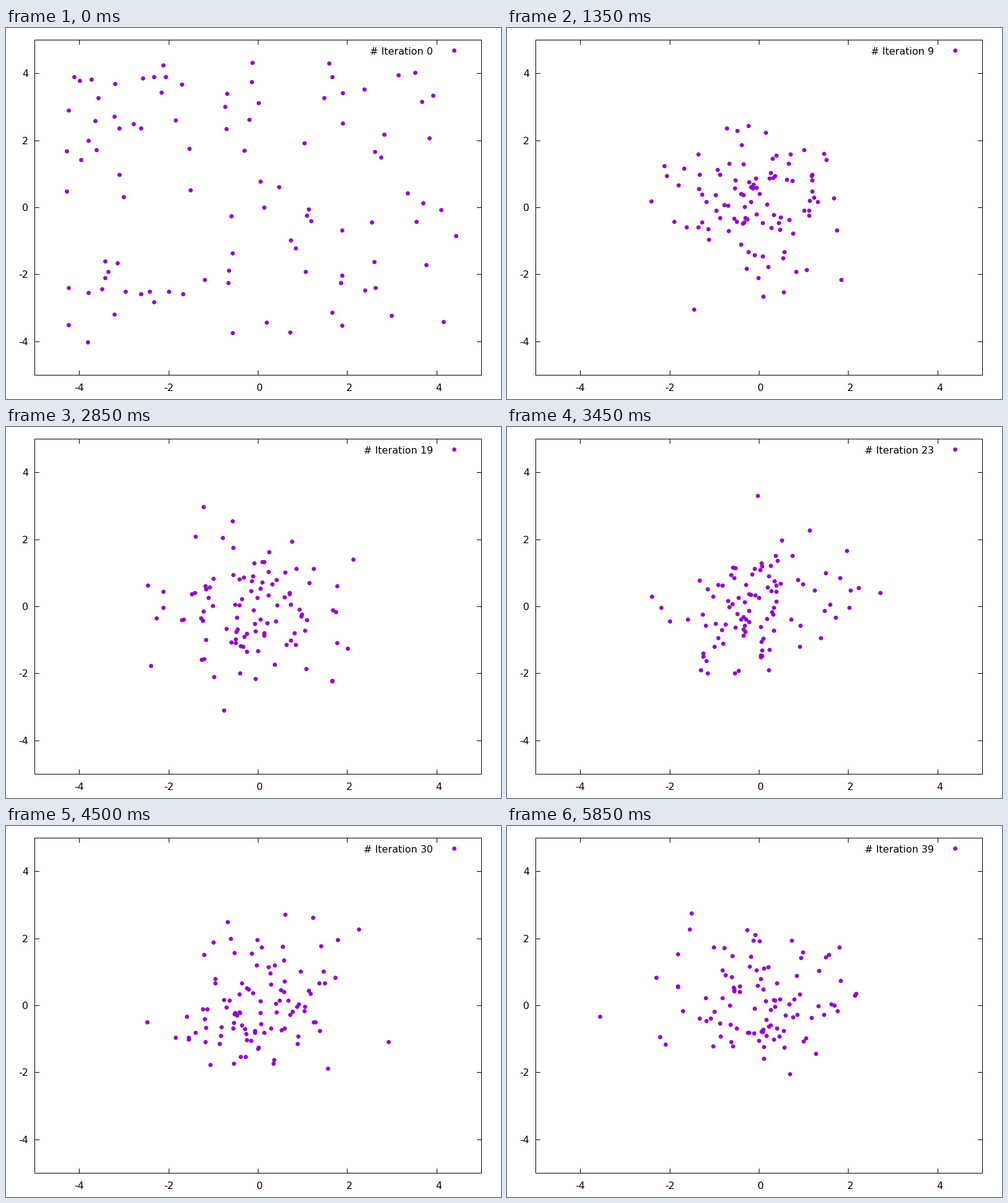
Recreate the animation shown at these times as a matplotlib script. Size 800 by 600 pixels, loop 6 s.

```python
import math

import numpy as np
import matplotlib.pyplot as plt
from matplotlib.animation import FuncAnimation
from matplotlib.patches import Circle

W, H, DPI = 800, 600, 100
FRAMES, INTERVAL = 40, 150
PT = 72 / DPI                                # points per pixel
LEFT, RIGHT, TOP, BOTTOM = 46.5, 768.5, 19.5, 561.5
CENTRE = np.array([407.5, 290.5])
SCALE = np.array([72.2, -54.2])              # pixels per data unit
TICK = 7
VIOLET = "#9400D3"
WALKERS = 100
PULL, SPREAD = 0.7, 1.05                     # memory per step, settled width


def to_pixels(points):
    """Data units to the centres of the nearest pixels."""
    return np.floor(CENTRE + SCALE * np.asarray(points)) + 0.5


def make_track():
    """Walkers start scattered, then gather into a restless cloud."""
    rng = np.random.default_rng(12)
    points = rng.uniform((-4.3, -4.1), (4.6, 4.35), (WALKERS, 2))
    noise = SPREAD * math.sqrt(1 - PULL ** 2)
    track = [points]
    for _ in range(FRAMES - 1):
        points = PULL * points + noise * rng.standard_normal(points.shape)
        track.append(points)
    return track


fig = plt.figure(figsize=(W / DPI, H / DPI), dpi=DPI, facecolor="white")
ax = fig.add_axes([0, 0, 1, 1])
ax.set_xlim(0, W)
ax.set_ylim(H, 0)
ax.axis("off")


def line(xs, ys):
    ax.plot(xs, ys, color="black", lw=PT, snap=False,
            solid_capstyle="projecting", solid_joinstyle="miter")


def label(x, y, text, ha):
    return ax.text(x, y, text, ha=ha, va="baseline", color="black",
                   family="DejaVu Sans", size=16 * PT)


def dot(x, y):
    return ax.add_patch(Circle((x, y), 3.4, color=VIOLET, lw=0))


def draw_axes():
    line([LEFT, RIGHT, RIGHT, LEFT, LEFT], [TOP, TOP, BOTTOM, BOTTOM, TOP])
    for value in range(-4, 5, 2):
        x, y = to_pixels([value, value])
        line([x, x], [TOP, TOP + TICK])
        line([x, x], [BOTTOM, BOTTOM - TICK])
        line([LEFT, LEFT + TICK], [y, y])
        line([RIGHT, RIGHT - TICK], [y, y])
        pad = 0 if value < 0 else 3          # room kept for a sign
        label(x + pad, 587, str(value), "center")
        label(36, y + 5.6, str(value), "right")


draw_axes()
track = make_track()
swarm = [dot(0, 0) for _ in range(WALKERS)]
dot(724.5, 36.5)
title = label(690, 43, "", "right")


def update(i):
    for walker, centre in zip(swarm, to_pixels(track[i])):
        walker.center = centre
    title.set_text(f"# Iteration {i}")
    return [*swarm, title]


anim = FuncAnimation(fig, update, frames=FRAMES, interval=INTERVAL,
                     repeat=True, repeat_delay=0)
plt.show()
```
